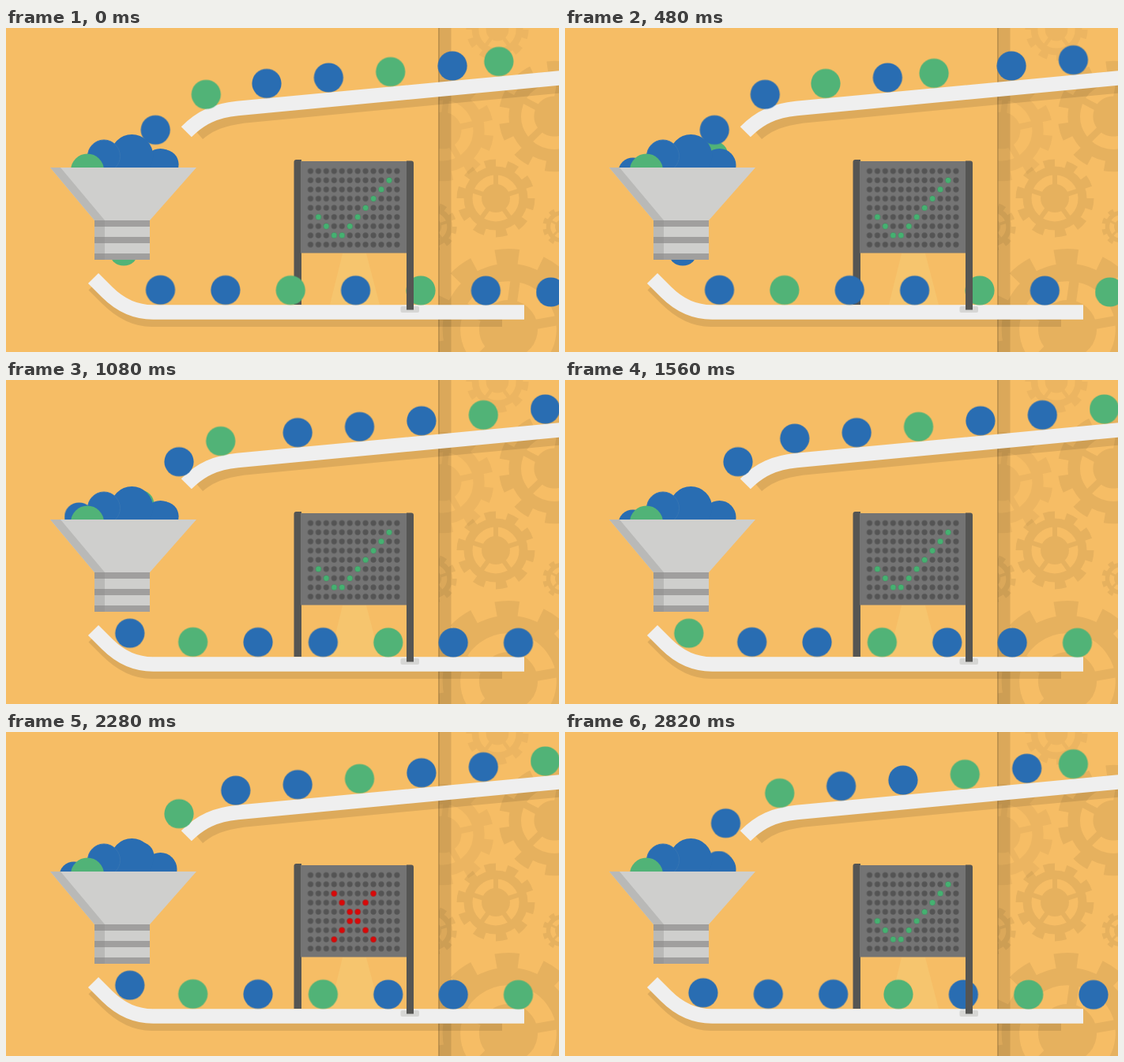
Write an HTML page without scripts that moves like this. It is 700 px wide and 411 px high and loops after 2880 ms.

```html
<!DOCTYPE html>
<html lang="en">
<head>
<meta charset="utf-8">
<title>Sorting line</title>
<style>
html, body { margin: 0; width: 100%; height: 100%; overflow: hidden; background: #f6bd65; }
svg { display: block; width: 700px; height: 411px; }

.b { fill: #296db2; }
.g { fill: #51b377; }
.belt { fill: none; stroke: #efefef; stroke-width: 18.5; }
.shade { fill: none; stroke: #000; stroke-opacity: .1; stroke-width: 18.5; }
.dots { fill: none; stroke-width: 7.2; stroke-linecap: round; }
.dots path { vector-effect: non-scaling-stroke; }

/* One tick is 60ms; --i is the place in line, --t a start tick. */
.up circle, .low circle, .left circle, .right circle { animation: 2880ms step-end infinite; }
.up circle { animation-name: up; animation-delay: calc((var(--i) * 4 - 72) * 60ms - 2ms); }
.low circle { animation-name: low; animation-delay: calc((var(--i) * -4 - 5) * 60ms - 2ms); }
.left circle { animation-name: left; animation-delay: calc((var(--t) - 48) * 60ms - 2ms); }
.right circle { animation-name: right; animation-delay: calc((var(--t) - 48) * 60ms - 2ms); }
.low .gb { animation-name: low, gb; animation-delay: calc((var(--i) * -4 - 5) * 60ms - 2ms), -2ms; }
.low .bg { animation-name: low, bg; animation-delay: calc((var(--i) * -4 - 5) * 60ms - 2ms), -2ms; }
.ok { animation: ok 2880ms step-end -2ms infinite; }
.no { animation: no 2880ms step-end -2ms infinite; }

@keyframes up {
  0% { transform: translate(721.8px, 33.1px); animation-timing-function: steps(22); }
  45.833% { transform: translate(290.8px, 74.1px); }
  47.917% { transform: translate(271.7px, 77.5px); }
  50% { transform: translate(253.3px, 84.3px); }
  52.083% { transform: translate(236px, 93px); }
  54.167% { transform: translate(219px, 103.7px); }
  56.25% { transform: translate(203.5px, 115.7px); }
  58.333% { transform: translate(189.2px, 129.3px); }
  60.417% { transform: translate(177px, 143px); }
  62.5% { transform: translate(169px, 158px); }
  64.583%, 100% { transform: translate(160px, 162px); }
}
@keyframes low {
  0% { transform: translate(149px, 262px); }
  2.083% { transform: translate(149px, 283px); }
  4.167% { transform: translate(150px, 304px); }
  6.25% { transform: translate(156.8px, 321.2px); }
  8.333% { transform: translate(174.9px, 330.8px); }
  10.417% { transform: translate(195.5px, 332.2px); animation-timing-function: steps(22); }
  56.25% { transform: translate(648.5px, 333.2px); }
  58.333% { transform: translate(669px, 333.2px); }
  60.417% { transform: translate(689.6px, 335px); }
  62.5% { transform: translate(710px, 338.5px); }
  64.583%, 100% { transform: translate(740px, 360px); }
}
@keyframes left {
  0% { transform: translate(113px, 162px); }
  2.083% { transform: translate(101.3px, 168.5px); }
  4.167% { transform: translate(92.5px, 174px); }
  6.25% { transform: translate(86px, 183px); }
  8.333%, 100% { transform: translate(86px, 202px); }
}
@keyframes right {
  0% { transform: translate(180px, 152px); }
  2.083% { transform: translate(188px, 162px); }
  4.167% { transform: translate(194.5px, 169.5px); }
  6.25% { transform: translate(200px, 173px); }
  8.333%, 100% { transform: translate(200px, 202px); }
}
@keyframes gb { 0% { fill: #51b377; } 50%, 100% { fill: #296db2; } }
@keyframes bg { 0% { fill: #296db2; } 50%, 100% { fill: #51b377; } }
@keyframes ok { 0% { opacity: 1; } 70.833% { opacity: 0; } 87.5%, 100% { opacity: 1; } }
@keyframes no { 0% { opacity: 0; } 70.833% { opacity: 1; } 87.5%, 100% { opacity: 0; } }
</style>
</head>
<body>
<svg viewBox="0 0 700 411">
  <defs>
    <g id="gear" fill="none" stroke="#000">
      <circle r="44" stroke-width="11" pathLength="20" stroke-dasharray="1 1"/>
      <circle r="35" stroke-width="11"/>
      <circle r="9" stroke-width="18"/>
      <path id="arm" d="M0 0V-32" stroke-width="6"/>
      <use href="#arm" transform="rotate(72)"/>
      <use href="#arm" transform="rotate(144)"/>
      <use href="#arm" transform="rotate(216)"/>
      <use href="#arm" transform="rotate(288)"/>
    </g>
    <pattern id="holes" x="380.5" y="175.7" width="9.95" height="11.65" patternUnits="userSpaceOnUse">
      <circle cx="4.98" cy="5.82" r="3.6" fill="#545454"/>
    </pattern>
    <clipPath id="wall"><path d="M548 0H700V411H548z"/></clipPath>
    <clipPath id="rim"><path d="M0 0H700V178H0z"/></clipPath>
  </defs>

  <rect width="700" height="411" fill="#f6bd65"/>

  <g clip-path="url(#wall)">
    <g opacity=".06">
      <use href="#gear" transform="translate(620 216)"/>
      <use href="#gear" transform="translate(694 112) rotate(10) scale(1.42)"/>
      <use href="#gear" transform="translate(636 382) rotate(8) scale(2.06)"/>
      <use href="#gear" transform="translate(540 252) scale(.62)"/>
      <use href="#gear" transform="translate(704 252) rotate(9) scale(.5)"/>
    </g>
    <g opacity=".035">
      <use href="#gear" transform="translate(622 2) scale(.8)"/>
      <use href="#gear" transform="translate(553 130) rotate(6) scale(1.3)"/>
    </g>
  </g>
  <path d="M547 0h16.5V411H547z" opacity=".11"/>
  <path d="M547 0h2V411h-2z" opacity=".12"/>

  <path class="shade" d="M243 134C258 121 275 115 300 111.5L710 72.5"/>
  <path class="belt" d="M228.3 131.7C247 113 265 105 293 102L710 62.6"/>
  <path class="shade" d="M111 326L128 343C142 357 160 369.7 184 369.7H628"/>

  <path d="M426 286h30L473 351H410z" fill="#f6c56e"/>
  <path d="M364.5 351V170q0-3 3-3h6.500V351z" fill="#555553"/>
  <path class="belt" d="M110.500 317.500L128 335C142 349 160 360.500 186 360.500H656"/>
  <rect x="499.500" y="353" width="23.500" height="8" rx="2" fill="#d6d6d4"/>

  <g class="low">
    <circle class="b" r="18.600" style="--i:0"/>
    <circle class="b" r="18.600" style="--i:1"/>
    <circle class="gb" r="18.600" style="--i:2"/>
    <circle class="bg" r="18.600" style="--i:3"/>
    <circle class="gb" r="18.600" style="--i:4"/>
    <circle class="bg" r="18.600" style="--i:5"/>
    <circle class="b" r="18.600" style="--i:6"/>
    <circle class="b" r="18.600" style="--i:7"/>
    <circle class="g" r="18.600" style="--i:8"/>
    <circle class="b" r="18.600" style="--i:9"/>
    <circle class="b" r="18.600" style="--i:10"/>
    <circle class="g" r="18.600" style="--i:11"/>
  </g>

  <rect x="373" y="169" width="135" height="116.500" fill="#747474"/>
  <rect x="380.500" y="175.700" width="119.400" height="104.850" fill="url(#holes)"/>
  <g class="dots" transform="translate(385.48 181.52) scale(9.95 11.65)">
    <path class="ok" stroke="#45b171" d="M1 5h.001M2 6h.001M3 7h.001M4 7h.001M5 6h.001M6 5h.001M7 4h.001M8 3h.001M9 2h.001M10 1h.001"/>
    <path class="no" stroke="#d90808" d="M3 2h.001M4 3h.001M5 4h.001M6 5h.001M7 6h.001M8 7h.001M8 2h.001M7 3h.001M6 4h.001M5 5h.001M4 6h.001M3 7h.001"/>
  </g>
  <path d="M507 357.500V168.500h6q3 0 3 3V357.500z" fill="#555553"/>

  <g clip-path="url(#rim)">
    <g class="right">
      <circle class="g" r="18.600" style="--t:7"/>
      <circle class="b" r="18.600" style="--t:15"/>
      <circle class="g" r="18.600" style="--t:19"/>
      <circle class="b" r="18.600" style="--t:45"/>
    </g>
    <g class="left">
      <circle class="b" r="18.600" style="--t:5"/>
      <circle class="b" r="18.600" style="--t:16"/>
      <circle class="b" r="18.600" style="--t:23"/>
      <circle class="b" r="18.600" style="--t:30"/>
      <circle class="b" r="18.600" style="--t:35"/>
    </g>
  </g>
  <g class="up">
    <circle class="g" r="18.600" style="--i:0"/>
    <circle class="b" r="18.600" style="--i:1"/>
    <circle class="b" r="18.600" style="--i:2"/>
    <circle class="g" r="18.600" style="--i:3"/>
    <circle class="b" r="18.600" style="--i:4"/>
    <circle class="g" r="18.600" style="--i:4.75"/>
    <circle class="b" r="18.600" style="--i:6"/>
    <circle class="b" r="18.600" style="--i:7"/>
    <circle class="b" r="18.600" style="--i:8"/>
    <circle class="g" r="18.600" style="--i:9"/>
    <circle class="b" r="18.600" style="--i:10"/>
    <circle class="b" r="18.600" style="--i:11"/>
  </g>
  <g clip-path="url(#rim)">
    <circle class="b" cx="195.500" cy="174" r="21"/>
    <circle class="b" cx="159.300" cy="162" r="27"/>
    <circle class="b" cx="124" cy="162.500" r="20.500" stroke="#3675b3"/>
    <circle class="g" cx="103" cy="180.500" r="21"/>
  </g>

  <path d="M56 177H241L182 244V294H112V244z" fill="#cfcfcd"/>
  <path d="M56 177H69L125 244V294H112V244z" fill="#b9b9b7"/>
  <path d="M112 244h70v8h-70zM112 265h70v8h-70zM112 286h70v8h-70z" fill="#a09f9e"/>
  <path d="M112 244h13v8h-13zM112 265h13v8h-13zM112 286h13v8h-13z" fill="#999897"/>
</svg>
</body>
</html>
```
